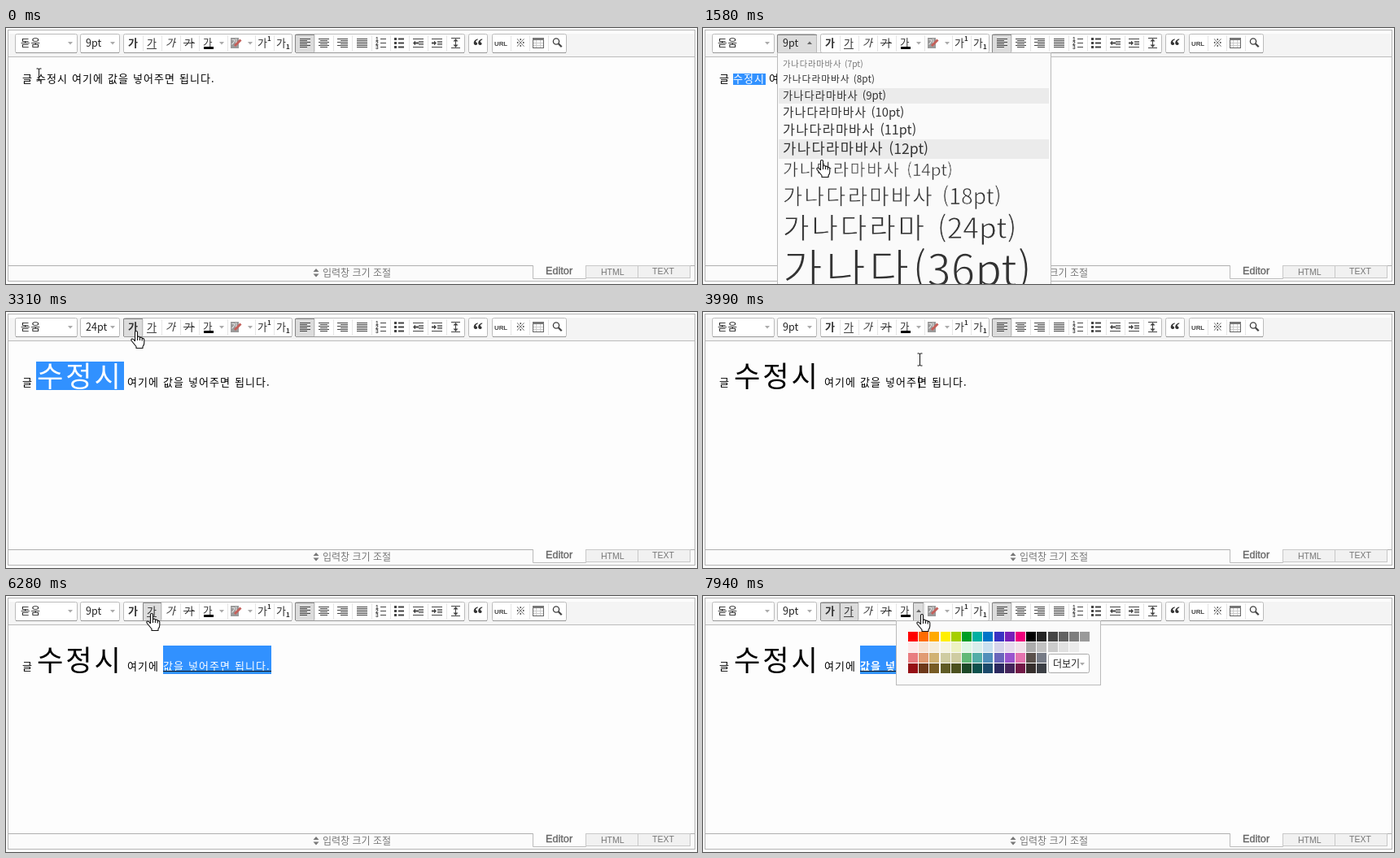
An HTML page that plays this animation: 849 by 315 pixels, repeating every 8000 ms.

```html
<!DOCTYPE html>
<html lang="ko">
<head>
<meta charset="utf-8">
<title>Rich text editor</title>
<style>
html, body { margin: 0; width: 100%; height: 100%; overflow: hidden; background: #fdfdfd; }
svg { display: block; font-family: "Noto Sans CJK KR", "Noto Sans CJK JP", "Noto Sans CJK", sans-serif; }
text { white-space: pre; }
.k { letter-spacing: .08em; }
.latin { font-family: "Liberation Sans", sans-serif; }
</style>
</head>
<body>
<svg id="stage" width="849" height="315" viewBox="0 0 849 315"></svg>
<script>
const LOOP = 8000;
const INK = '#444', BLUE = '#3191ff', PANEL = '#fafafa';
const stage = document.getElementById('stage');
const $ = id => document.getElementById(id);

const rect = (x, y, w, h, fill, extra = '') =>
  `<rect x="${x}" y="${y}" width="${w}" height="${h}" fill="${fill}" ${extra}/>`;
const box = (x, y, w, h, fill = '#fff', stroke = '#bdbdbd', r = 0) =>
  rect(x + .5, y + .5, w - 1, h - 1, fill, `stroke="${stroke}" rx="${r}"`);
const text = (x, y, str, size, fill = '#222', extra = '') =>
  `<text x="${x}" y="${y}" font-size="${size}" fill="${fill}" ${extra}>${str}</text>`;
// Outlines letters in the colour behind them, for a lighter face.
const thin = (background, size) => `stroke="${background}" stroke-width="${size * .026}"`;
const stroke = (d, color = INK, width = 1) =>
  `<path d="${d}" fill="none" stroke="${color}" stroke-width="${width}"/>`;
const fill = (d, color = INK) => `<path d="${d}" fill="${color}"/>`;
const down = (x, y = 17) => fill(`M${x - 3} ${y}h6l-3 3.4z`, '#aaa');
const up = (x, y = 20) => fill(`M${x - 3} ${y}h6l-3 -3.4z`, '#666');
const each = (n, fn) => Array.from({ length: n }, (_, i) => fn(i)).join('');

// ---- toolbar ----
const group = (x, right) =>
  box(x, 7, right - x, 24, '#fff', '#bbb', 2) + rect(x + 1, 30, right - x - 2, 1, '#999');
const divider = x => rect(x, 9, 1, 20, '#e6e6e6');
const pressed = (x, right) =>
  rect(x, 8, right - x, 22, '#dcdcdc') + stroke(`M${x + .5} 30V8.5H${right}`, '#888') +
  stroke(`M${right - .5} 9v21`, '#bbb');
const ga = (x, extra = '', size = 13) => text(x, 23, '가', size, '#333', extra);
const align = (x, anchor, short = 9) => each(6, i => {
  const w = i % 2 ? short : 13;
  return rect(x + (13 - w) * anchor, 13 + 2 * i, w, 1, INK);
});
const indent = (x, dir) =>
  [13, 23].map(y => rect(x, y, 13, 1, INK)).join('') +
  [16, 18, 20].map(y => rect(x + 7, y, 6, 1, INK)).join('') +
  (dir < 0 ? fill(`M${x} 18.5l3-3v2h4v2h-4v2z`) : fill(`M${x + 6} 18.5l-3-3v2h-3v2h3v2z`));

const groups = [[11, 88], [91, 140], [144, 352], [355, 564], [568, 592], [597, 689]];
const dividers = [168, 191, 214, 237, 272, 306, 329, 379, 402, 425, 449, 472, 495, 518, 541, 620, 643, 666];
const hoverable = [[92, 139], [145, 168], [168, 191], [191, 214], [214, 237], [237, 259],
  [259, 272], [272, 306], [306, 329], [329, 351]];

const icons =
  text(18, 23, '돋움', 12.5, '#222', 'class="k"') + down(79) +
  ga(150, 'font-weight="700"') +
  ga(173) + rect(173, 25, 12, 1, INK) +
  ga(196, 'font-style="italic"') +
  ga(219) + rect(218, 18, 14, 1, INK) +
  ga(242, '', 12.5) + rect(243, 23, 12, 3, '#000') +
  rect(276, 12, 10, 13, '#9a9a9a') + text(276.5, 21, '가', 9, '#fff') +
  stroke('M281 22l7.5-7.5', '#c4605a', 3) + down(300) +
  ga(309) + text(321, 16, '1', 8, '#333', 'font-weight="700"') +
  ga(332) + text(344, 26, '1', 8, '#333', 'font-weight="700"') +
  align(361, 0) + align(384, .5) + align(407, 1) + align(431, 0, 13) +
  each(3, i => text(454, 15.5 + 5 * i, i + 1, 6.5, INK, 'class="latin" font-weight="700"') +
    rect(460, 13 + 5 * i, 7, 1, INK) +
    rect(477, 12 + 5 * i, 3, 3, INK) + rect(482, 12.5 + 5 * i, 7, 2, INK)) +
  indent(500, -1) + indent(523, 1) +
  stroke('M547 12.5h11M547 24.5h11M552.5 14v9') + fill('M552.5 13l3 3.5h-6zM552.5 24l3-3.5h-6z') +
  text(573.5, 30, '“', 25, '#333', 'font-family="Liberation Serif, serif" font-weight="700"') +
  text(600, 21.5, 'URL', 7.8, INK, 'class="latin" font-weight="700"') +
  text(626, 23, '※', 12.5, '#333') +
  box(647, 12, 14, 13, '#fff', '#666') + rect(647, 12, 14, 3, '#777') +
  stroke('M648 18.5h12M648 21.5h12M651.5 15v9M656.5 15v9', '#ccc') +
  `<circle cx="676" cy="16.5" r="3.6" fill="none" stroke="${INK}" stroke-width="1.4"/>` +
  stroke('M678.7 19.2l4 4', INK, 2.2);

// ---- frame and status bar ----
const chrome =
  box(2, 2, 845, 310, '#fdfdfd', '#b5b5b5') +
  rect(3, 7, 843, 28, '#f4f4f4') + rect(3, 35, 843, 1, '#bcbcbc') +
  rect(3, 292, 843, 19, '#fbfbfb') + rect(3, 292, 843, 1, '#b0b0b0') +
  fill('M377.5 300l3.5-4 3.5 4zM377.5 302.5l3.5 4 3.5-4z', '#777') +
  text(389, 305.5, '입력창 크기 조절', 12, '#777') +
  rect(648, 291, 64, 17, '#fdfdfd') + stroke('M647.5 292v16.5h65v-16', '#bbb') +
  box(712, 292, 65, 16, '#f1f1f1', '#c8c8c8') + box(776, 292, 65, 16, '#f1f1f1', '#c8c8c8') +
  text(663, 303, 'Editor', 12.7, '#666', 'class="latin" stroke="#666" stroke-width=".35"') +
  text(731, 304, 'HTML', 10.5, '#777', 'class="latin"') +
  text(794, 303, 'TEXT', 10.5, '#777', 'class="latin"');

// ---- size menu: [points, sample, row top, text centre] ----
const sizes = [
  [7, '가나다라마바사 ', 35, 44], [8, '가나다라마바사 ', 54, 63], [9, '가나다라마바사 ', 74, 83],
  [10, '가나다라마바사 ', 94, 103], [11, '가나다라마바사 ', 114, 125], [12, '가나다라마바사 ', 137, 148],
  [14, '가나다라마바사 ', 161, 174], [18, '가나다라마바사 ', 188, 207], [24, '가나다라마 ', 227, 246],
  [36, '가나다', 268, 297]];
const menuRow = i => {
  const top = sizes[i][2], next = sizes[i + 1] ? sizes[i + 1][2] : 330;
  return rect(93, top, 332, next - top - (i === 2 ? 1 : 0), '#ebebeb');
};
const menu = box(91, 30, 337, 300, PANEL, '#bbb') + menuRow(2) + '<g id="menuHover"></g>' +
  sizes.map(([pt, sample, , mid]) => {
    const size = pt * 1.475;
    return text(98, mid + size * .38, `<tspan class="k">${sample}</tspan>(${pt}pt)`, size,
      pt < 8 ? '#777' : '#333', pt >= 14 ? thin(PANEL, size) : '');
  }).join('');

// ---- colour palette ----
const palette = [
  'ff0000 ff6c00 ffaa00 ffef00 a6cf00 009e25 00b0a2 0075c8 3a32c3 7820b9 ef007c 000000 252525 464646 636363 7d7d7d 9a9a9a',
  'ffe8e8 f7e2d2 f5eddc f5f4e0 edf2c2 def7e5 d9eeec c9e0f0 d6d4eb e7dbed f1e2ea acacac c2c2c2 cccccc e1e1e1 ebebeb fafafa',
  'e97d81 e19b73 d1b274 cfcca2 cfcca2 61b977 53aea8 518fbb 6a65bb 9a54ce e573ae 5a504b 767b86',
  '951015 6e391a 785c25 5f5b25 4c511f 1c4827 0d514c 1b496a 2b285f 45245b 721947 352e2c 3c3f45'];
const colors = box(237, 30, 252, 80, PANEL, '#bbb') +
  palette.map((row, r) => row.split(' ').map((c, i) =>
    rect(252 + Math.round(i * 13.2), 44 + 13 * r, 12, 12, '#' + c)).join('')).join('') +
  box(424, 71, 51, 24, '#fff', '#aaa', 2) + text(430, 87.5, '더보기', 12, '#222') + down(466, 82);

// ---- pointers, hot spot at 0,0 ----
const beam = stroke('M-3 -7.5h2.5l.5 .5l.5-.5h2.5M0 -7.5v15M-3 7.5h2.5l.5-.5l.5 .5h2.5', '#111');
const hand = `<path transform="translate(-7 0)" fill="#fff" stroke="#111" stroke-width="1.1" stroke-linejoin="round"
  d="M5.5 13V1.8Q5.5.5 7 .5T8.5 1.8V7.5Q11.2 6.5 11.4 8.5Q14 7.5 14.2 9.5Q16.8 9 16.8 11.5V15Q16.8 17.5 15 19.5V21.5H7V19.5Q4.5 16.5 1.3 12.5Q.2 10.6 1.8 10Q3.5 9.6 5.5 13M8.5 7.5V12M11.4 8.5V12M14.2 9.5V12.5"/>`;

stage.innerHTML =
  `<clipPath id="selClip"><rect id="selClipRect"/></clipPath>` + chrome +
  `<g id="line"></g><rect id="sel" fill="${BLUE}"/><g id="lineSel" clip-path="url(#selClip)"></g>` +
  '<g id="underline"></g>' + rect(265, 79, 1, 15, '#000', 'id="caret"') +
  groups.map(g => group(...g)).join('') + dividers.map(divider).join('') +
  '<g id="states"></g>' + icons + '<g id="labels"></g>' +
  `<g id="menu">${menu}</g><g id="colors">${colors}</g>` +
  `<g id="beam">${beam}</g><g id="hand">${hand}</g>`;

// ---- motion ----
const pointer = [
  [120, 40, 57], [600, 78, 64], [870, 78, 64], [950, 125, 25], [1140, 125, 25], [1190, 125, 27],
  [1350, 125, 27], [1580, 146, 162], [2040, 165, 249], [2460, 165, 249], [2700, 174, 32],
  [2820, 157, 22], [3300, 157, 22], [3720, 266, 58], [4110, 266, 58], [4570, 199, 86],
  [4690, 199, 86], [5080, 322, 89], [5250, 361, 89], [5500, 361, 89], [6070, 179, 21],
  [6285, 179, 21], [6400, 161, 22], [6950, 161, 22], [7350, 215, 28], [7720, 269, 22]];
const dragEdge = [[4690, 193], [5080, 285], [5250, 330]];
const stops = [193, 206, 219, 224, 237, 250, 263, 277, 294, 307, 326];

function at(track, t) {
  const i = track.findIndex(k => k[0] > t);
  if (i < 1) return (i ? track[track.length - 1] : track[0]).slice(1);
  const a = track[i - 1], b = track[i], p = (t - a[0]) / (b[0] - a[0]);
  return a.slice(1).map((v, n) => v + (b[n + 1] - v) * p);
}

function selection(t, x) {
  if (t < 2300) {
    const n = t < 600 ? Math.max(0, Math.min(3, Math.round((x - 37) / 13.2))) : 3;
    return [37, 56, Math.round(n * 13.3), 14];
  }
  if (t < 3870) return [37, 61, t < 3310 ? 106 : 108, 35];
  if (t < 4690) return [0, 0, 0, 0];
  const edge = t >= 6800 ? 329 : stops.filter(s => s <= at(dragEdge, t)[0]).pop();
  return [193, 61, edge - 193, 35];
}

function sentence(t, color) {
  const large = t >= 2300, heavy = t >= 3310, y = large ? 91 : 67;
  const start = !large ? 81 : heavy ? 149 : 147;
  const word = (x, str, weight = 400) =>
    text(x, y, str, 13, color, `class="k" font-weight="${weight}"`);
  const title = () => text(heavy ? 38 : 37, 91.5, '수정시', 35.2, color,
    `class="k" ${heavy ? 'font-weight="500"' : thin(BLUE, 35.2)}`);
  const tail = t >= 6800 ? 700 : 400;
  return word(20, '글') + (large ? title() : word(37, '수정시')) +
    word(start, '여기에') + word(start + 44, '값을', tail) +
    word(start + 75, '넣어주면', tail) + word(start + 132, '됩니다.', tail);
}

const cache = {};
function put(id, markup) {
  if (cache[id] !== markup) $(id).innerHTML = cache[id] = markup;
}
const show = (id, on) => $(id).setAttribute('visibility', on ? 'visible' : 'hidden');

function draw(t) {
  const [x, y] = at(pointer, t).map(Math.round);
  const menuOpen = t >= 1370 && t < 2300, colorsOpen = t >= 7940;

  put('line', sentence(t, '#000'));
  put('lineSel', sentence(t, '#fff'));
  const area = selection(t, x);
  for (const id of ['sel', 'selClipRect'])
    ['x', 'y', 'width', 'height'].forEach((name, i) => $(id).setAttribute(name, area[i]));
  put('underline', t >= 6280 ? rect(193, 92, area[2], 1, '#111') : '');
  show('caret', t >= 3870 && t < 4390);

  const hovered = y < 31 && !menuOpen && hoverable.find(([l, r]) => x >= l && x < r);
  put('states', pressed(355, 379) +
    (hovered ? rect(hovered[0], 8, hovered[1] - hovered[0], 22, '#ececec') : '') +
    (menuOpen ? pressed(91, 140) : '') +
    ((t >= 3310 && t < 3990) || t >= 6800 ? pressed(144, 168) : '') +
    (t >= 6280 ? pressed(168, 191) : '') +
    (colorsOpen ? pressed(258, 271) : ''));
  put('labels', text(98, 22.5, t >= 2300 && t < 3990 ? '24pt' : '9pt', 12.5) +
    (menuOpen ? up(131) : down(131)) + (colorsOpen ? up(265) : down(265)));

  show('menu', menuOpen);
  show('colors', colorsOpen);
  const row = sizes.filter(s => s[2] <= y - 3).length - 1;
  put('menuHover', menuOpen && row >= 0 ? menuRow(row) : '');

  const isHand = menuOpen || y < 34;
  show('hand', isHand);
  show('beam', !isHand);
  $('hand').setAttribute('transform', `translate(${x} ${y})`);
  $('beam').setAttribute('transform', `translate(${x + .5} ${y + .5})`);
}

const begin = performance.now();
function tick() {
  draw((performance.now() - begin) % LOOP);
  requestAnimationFrame(tick);
}
tick();
</script>
</body>
</html>
```
